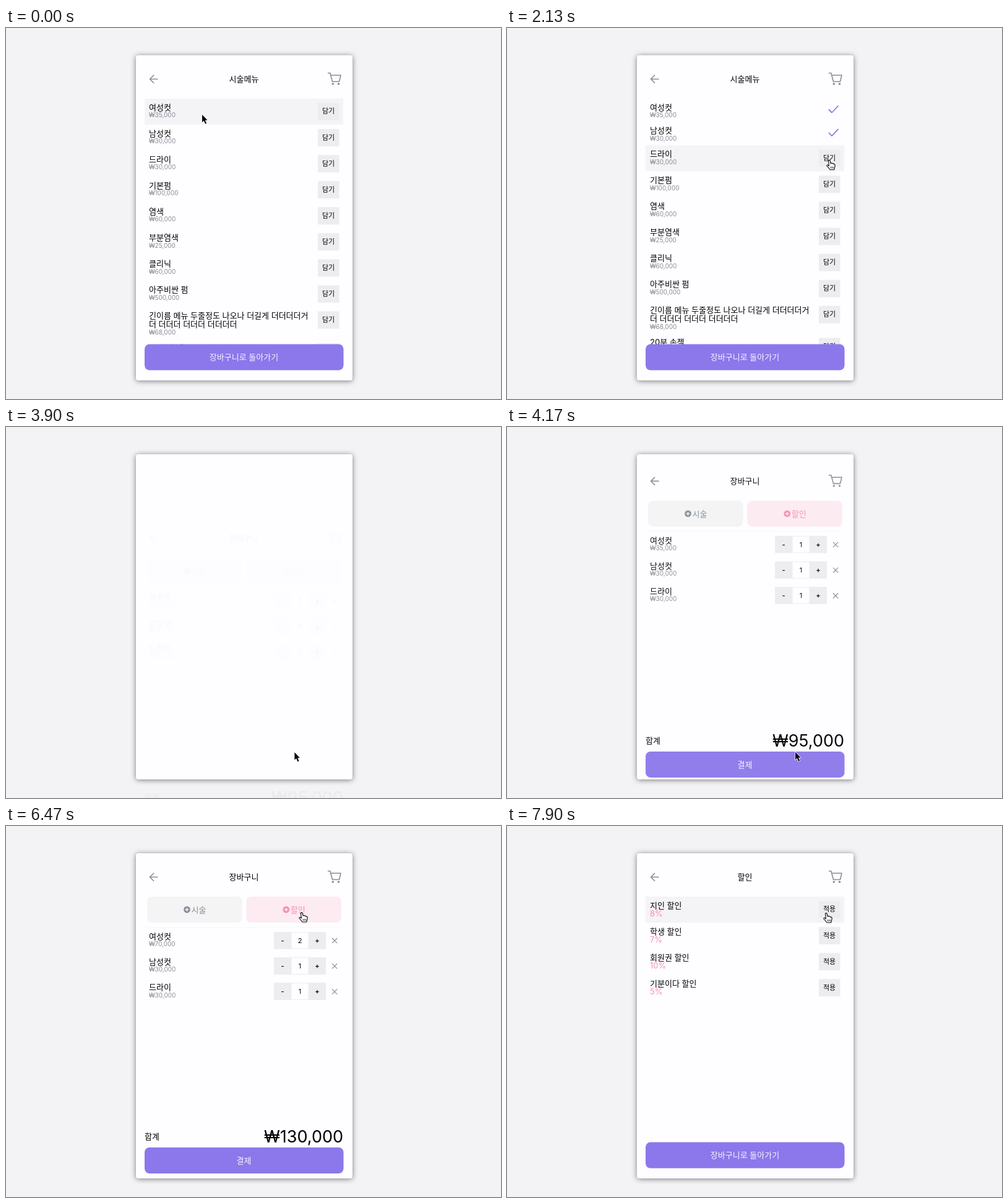
Recreate the animation shown at these times as an HTML page. Size 800x599 px, loop 8000 ms.

```html
<!DOCTYPE html>
<html lang="ko">
<head>
<meta charset="utf-8">
<title>시술메뉴</title>
<style>
  html, body { margin: 0; width: 100%; height: 100%; overflow: hidden; background: #f3f2f5; }
  .card { position: absolute; left: 210px; top: 43.5px; width: 349.5px; height: 525px;
          border-radius: 4px; background: #fefdff; box-shadow: 0 1px 9px rgba(0, 0, 0, .5); }
  svg { position: absolute; left: 0; top: 0; }
  text { font-family: Inter, "Noto Sans CJK KR", "Noto Sans CJK", sans-serif; }
</style>
</head>
<body>
<div class="card"></div>
<svg id="stage" width="800" height="599" viewBox="0 0 800 599"></svg>
<script>
const LOOP = 8000, FADE = 400, LIFT = 100;
const GRAY = '#868e96', PINK = '#f48fb4', PURPLE = '#8c78eb', CHIP = '#edecef', HOVER = '#f4f3f5';

const MENU = [
  ['여성컷', 35000], ['남성컷', 30000], ['드라이', 30000], ['기본펌', 100000], ['염색', 60000],
  ['부분염색', 25000], ['클리닉', 60000], ['아주비싼 펌', 500000],
  ['긴이름 메뉴 두줄정도 나오나 더길게 더더더더거|더 더더더 더더더 더더더더', 68000], ['20분 손젤', 20000]
];
const DISCOUNTS = [['지인 할인', 8], ['학생 할인', 7], ['회원권 할인', 10], ['기분이다 할인', 5]];

const ADD_CLICKS = [780, 1480, 2280];
const PLUS_CLICK = 5150;
const PAGES = [
  { draw: menuPage, exit: 3480 },
  { draw: cartPage, enter: 3880, exit: 6800 },
  { draw: discountPage, enter: 7200 }
];
// time, x, y of the pointer tip
const POINTER = [
  [0, 317, 140], [600, 519, 138], [1050, 521, 137], [1400, 520, 176], [1750, 521, 176],
  [2150, 521, 214], [2550, 522, 213], [3230, 474, 494], [3400, 467, 526], [4250, 466, 525],
  [5000, 504, 184], [5970, 504, 184], [6450, 478, 140], [7350, 480, 139], [7800, 516, 141], [LOOP, 516, 141]
];

const won = n => '₩' + n.toLocaleString('en-US');
const clamp = v => Math.min(1, Math.max(0, v));

// cubic-bezier(.25, .1, .25, 1)
function ease(p) {
  const curve = (a, b, s) => 3 * a * s * (1 - s) ** 2 + 3 * b * s * s * (1 - s) + s ** 3;
  let lo = 0, hi = 1;
  for (let i = 0; i < 20; i++) {
    const mid = (lo + hi) / 2;
    if (curve(.25, .25, mid) < p) lo = mid; else hi = mid;
  }
  return curve(.1, 1, lo);
}

function pointerAt(t) {
  const i = POINTER.findIndex(k => k[0] > t);
  const [t0, x0, y0] = POINTER[i - 1], [t1, x1, y1] = POINTER[i];
  const p = (t - t0) / (t1 - t0), s = p * p * (3 - 2 * p);
  return { x: x0 + (x1 - x0) * s, y: y0 + (y1 - y0) * s };
}

// y is the vertical centre of the glyphs
const text = (s, x, y, { size = 13, fill = '#000', anchor = 'start', weight = 400 } = {}) =>
  `<text x="${x}" y="${y + size * .36}" font-size="${size}" fill="${fill}" text-anchor="${anchor}" font-weight="${weight}">${s}</text>`;
const centered = (s, x, y, style) => text(s, x, y, { anchor: 'middle', ...style });
const rect = (x, y, w, h, fill, r = 0) =>
  `<rect x="${x}" y="${y}" width="${w}" height="${h}" rx="${r}" fill="${fill}"/>`;
const line = (d, stroke, width) =>
  `<path d="${d}" fill="none" stroke="${stroke}" stroke-width="${width}" stroke-linejoin="round"/>`;

function hit(ui, x, y, w, h) {
  const p = ui.pointer;
  return ui.active && p.x >= x && p.x < x + w && p.y >= y && p.y < y + h;
}
function button(ui, x, y, w, h, fill, r) {
  if (hit(ui, x, y, w, h)) ui.hand = true;
  return rect(x, y, w, h, fill, r);
}
const rowBack = (ui, y, h) => hit(ui, 224, y, 321, h) ? rect(224, y, 321, h, HOVER) : '';

const header = title =>
  line('M245.5 82.5H232.5M239 76l-6.5 6.5 6.5 6.5', '#879095', 1.6) +
  centered(title, 384.5, 82.5, { weight: 500 }) +
  line('M520 72.8h3.8l3.7 13.7h11l2.5-10.2h-16', '#879095', 1.6) +
  '<circle cx="528.3" cy="90.2" r="1.7" fill="#879095"/><circle cx="537.5" cy="90.2" r="1.7" fill="#879095"/>';

const mainButton = (ui, label, y) =>
  button(ui, 224, y, 321.5, 42, PURPLE, 8) + centered(label, 384.5, y + 21, { fill: '#f8f5ff' });

const rowButton = (ui, label, y) =>
  button(ui, 504, y + 7, 34.5, 28, CHIP) + centered(label, 521, y + 20.5, { size: 11, weight: 500 });

const price = (n, y) => text(won(n), 231, y, { size: 10, fill: GRAY });

function menuPage(ui, t) {
  let y = 114, out = header('시술메뉴');
  MENU.forEach(([name, cost], i) => {
    const lines = name.split('|'), added = t >= ADD_CLICKS[i];
    const content = 37.67 + 14 * (lines.length - 1);
    const h = added ? content : Math.max(content, 42.06);
    out += rowBack(ui, y, h);
    lines.forEach((s, n) => out += text(s, 231, y + 14 + 14 * n));
    out += price(cost, y + 12.6 + 14 * lines.length);
    out += added ? line(`M520 ${y + 17.5}l5 5 10.5-11`, PURPLE, 1.8) : rowButton(ui, '담기', y);
    y += h;
  });
  return out + mainButton(ui, '장바구니로 돌아가기', 510.5);
}

function cartTab(ui, label, x, back, fill) {
  const cx = x + 64.5;
  return button(ui, x, 114, 153.5, 42, back, 8) +
    `<circle cx="${cx}" cy="135" r="5.4" fill="${fill}"/>` +
    line(`M${cx - 3} 135h6m-3-3v6`, back, 1.5) +
    text(label, x + 71.5, 135, { fill });
}

function cartPage(ui, t) {
  let out = header('장바구니') +
    cartTab(ui, '시술', 228, '#f4f4f5', GRAY) + cartTab(ui, '할인', 388.3, '#fdebf2', PINK) +
    rect(224, 163, 321, 1, '#f7f6f9');
  let total = 0;
  MENU.slice(0, 3).forEach(([name, cost], i) => {
    const y = 164 + 41.2 * i, mid = y + 20.7;
    const count = i === 0 && t >= PLUS_CLICK ? 2 : 1;
    total += cost * count;
    out += rowBack(ui, y, 41.2) + text(name, 231, y + 14) + price(cost * count, y + 26.5) +
      rect(433, y + 7, 84, 27.5, CHIP) + rect(461.5, y + 8, 27, 25.5, '#fefdff') +
      button(ui, 433, y + 7, 28, 27.5, CHIP) + button(ui, 489, y + 7, 28, 27.5, CHIP) +
      centered('-', 447, mid, { size: 11, weight: 600 }) +
      centered(count, 475, mid, { size: 11 }) +
      centered('+', 503, mid, { size: 11, weight: 600 }) +
      line(`M527 ${mid - 3.7}l8.2 8.2m0-8.2l-8.2 8.2`, GRAY, 1.2);
  });
  return out + text('합계', 224, 501, { weight: 500 }) +
    text(won(total), 545, 501.3, { size: 27, anchor: 'end' }) + mainButton(ui, '결제', 519);
}

function discountPage(ui) {
  return header('할인') + DISCOUNTS.map(([name, percent], i) => {
    const y = 114 + 42.06 * i;
    return rowBack(ui, y, 42.06) + text(name, 231, y + 14) +
      text(percent + '%', 231, y + 27.3, { fill: PINK }) + rowButton(ui, '적용', y);
  }).join('') + mainButton(ui, '장바구니로 돌아가기', 510.5);
}

function cursor({ x, y }, hand) {
  const shape = hand
    ? '<path d="M-1.5 1C-1.5-.8 1-.8 1.2.8L2 5C3 4 4.5 4.3 4.8 5.3 6 4.7 7 5.2 7.2 6.2 8.6 5.8 9.3 6.8 9.2 8.2L8.5 12 7.6 15H1L-1.3 12-4 9C-4.6 7.4-3 6.8-2 7.7L-.6 9Z" fill="#fff" stroke="#000" stroke-width="1.1" stroke-linejoin="round"/><path d="M2.2 10v3M4.3 10v3M6.3 10v3" stroke="#000" stroke-width=".8"/>'
    : '<path d="M0 0V12.2L2.8 9.6 5 14.8 7.1 13.9 4.9 8.8H8.6Z" fill="#000" stroke="#fff" stroke-width="1.4" stroke-linejoin="round" paint-order="stroke"/>';
  return `<g transform="translate(${x} ${y})">${shape}</g>`;
}

const stage = document.getElementById('stage');
function render(t) {
  const page = PAGES.findLast(p => t >= (p.enter ?? 0));
  const shown = ease(clamp((t - (page.enter ?? -FADE)) / FADE)) * (1 - ease(clamp((t - (page.exit ?? LOOP)) / FADE)));
  const ui = { pointer: pointerAt(t), active: shown > .995, hand: false };
  const body = page.draw(ui, t);
  stage.innerHTML =
    `<g opacity="${shown}" transform="translate(0 ${LIFT * (1 - shown)})">${body}</g>` + cursor(ui.pointer, ui.hand);
}

let start;
function tick(now) {
  start ??= now;
  render((now - start) % LOOP);
  requestAnimationFrame(tick);
}
render(0);
requestAnimationFrame(tick);
</script>
</body>
</html>
```
